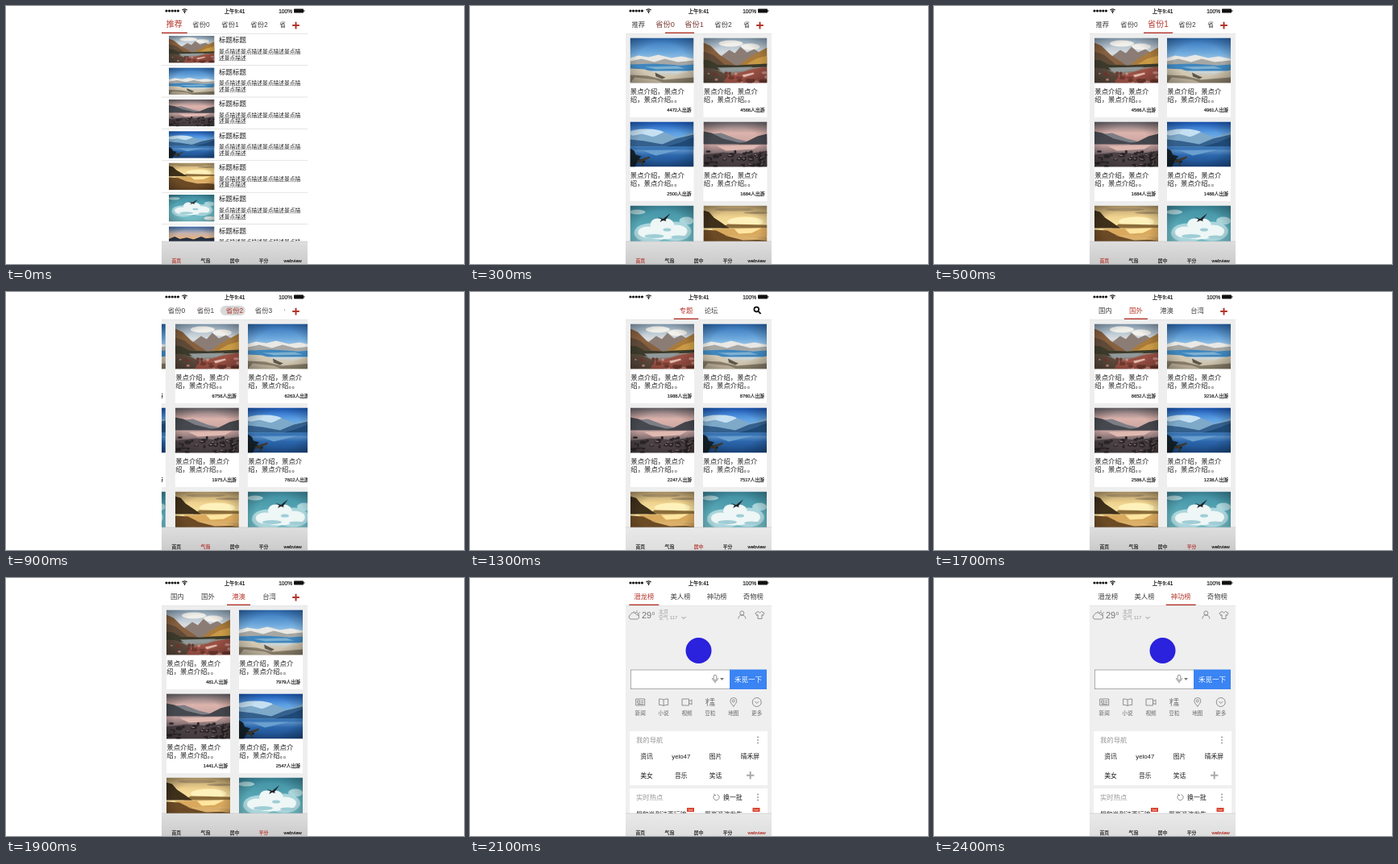
Recreate the animation shown at these times as an HTML page. Size 568 by 320 pixels, loop 2.5 s.

```html
<!DOCTYPE html>
<html lang="zh">
<head>
<meta charset="utf-8">
<title>Tab pages</title>
<style>
  html, body { margin: 0; width: 100%; height: 100%; overflow: hidden; background: #fff; }
  svg { display: block; width: 568px; height: 320px; }
  text { font-family: "Liberation Sans", "Noto Sans CJK SC", "Noto Sans CJK", sans-serif; fill: #1c1c1c; white-space: pre; }
  .intro { font-family: "Noto Sans CJK TC", "Noto Sans CJK", sans-serif; }
  .e { text-anchor: end; }
  .firm { stroke: #1c1c1c; stroke-width: .18; }
  .tab.on { fill: #b3352c; stroke: #b3352c; }
  .line { fill: none; stroke: #777; stroke-width: .8; }
</style>
</head>
<body>
<svg viewBox="-193 0 568 320">
  <defs>
    <clipPath id="screen"><path d="M0 0h181v320H0z"/></clipPath>
    <clipPath id="short"><path d="M0 12h153v24H0z"/></clipPath>
    <filter id="soft" x="-5%" y="-5%" width="110%" height="110%"><feGaussianBlur stdDeviation=".5"/></filter>
    <radialGradient id="edge" r=".75"><stop offset=".5" stop-opacity="0"/><stop offset="1" stop-opacity=".38"/></radialGradient>
  </defs>
  <g id="phone" clip-path="url(#screen)"></g>
</svg>
<script>
const WIDTH = 181, STEP = 100, RED = '#b3352c';
const $ = s => document.querySelector(s);
const text = (x, y, size, str, attr = '') =>
  `<text x="${x}" y="${y + size * .37}" font-size="${size}" ${attr}>${str}</text>`;
const mid = (x, y, size, str, attr = '') => text(x, y, size, str, `text-anchor="middle" ${attr}`);
const rect = (x, y, w, h, fill, attr = '') =>
  `<rect x="${x}" y="${y}" width="${w}" height="${h}" fill="${fill}" ${attr}/>`;
const path = (fill, d) => `<path fill="${fill}" d="${d}"/>`;
const line = (x, y, d) => `<path class="line" transform="translate(${x} ${y})" d="${d}"/>`;
const ovals = (fill, list) => list.map(([x, y, rx, ry = rx]) =>
  `<ellipse cx="${x}" cy="${y}" rx="${rx}" ry="${ry}" fill="${fill}"/>`).join('');
const fade = (id, ...colors) => `<linearGradient id="${id}" x2="0" y2="1">${colors.map((c, i) =>
  `<stop offset="${i / (colors.length - 1)}" stop-color="${c}"/>`).join('')}</linearGradient>`;
const range = n => [...Array(n).keys()];
const lerp = (f, p) => {
  const i = Math.floor(p);
  return f(i) + (f(i + 1) - f(i)) * (p - i);
};

let seed = 7;
const random = () => (seed = seed * 16807 % 2147483647) / 2147483647;
const visitors = () => 1000 + Math.floor(random() * 8000);

// Landscapes, each on a 79 by 56 field over a graded backdrop
const scatter = (n, top) => range(n).map(() =>
  [random() * 79, top + random() * (56 - top), 1.2 + random() * 3, .8 + random() * 1.6]);
const stones = scatter(50, 37), leaves = scatter(24, 43);
const photos = [
  [['#8fa9bf', '#d8dde0', '#8e8a80', '#6d665c'],
    ovals('#f1efea', [[34, 7, 15, 4], [58, 11, 12, 4]]) +
    path('#8b7d75', 'M18 26L32 15l7 4 7-8 8 7 9-4 16 10v10H18z') +
    path('#86603f', 'M0 6l9 4 11 11 15 10 5 4H0z') + path('#5f4a38', 'M0 17l12 4 14 12H0z') +
    path('#a87a3c', 'M79 12L66 19 54 26 44 34h35z') + path('#c99a45', 'M79 22l-14 4-12 7h26z') +
    path('#3b3a2b', 'M0 27l8 1 9 5 24 1 38-2v4l-30 1-30 3-19-2z') +
    path('#92999a', 'M17 37l44-1-10 5-26 2z') + path('#59493c', 'M0 37l13 1 14 7 14 5v6H0z') +
    path('#9b5044', 'M30 47l16-4 18-5 15-2v20H24z') + ovals('#c98b80', leaves.slice(0, 10)) +
    ovals('#70392f', leaves.slice(10)) + path('#e0b9ac', 'M48 46l14-3 1 2-13 4z')],
  [['#2f6fb8', '#6faadd', '#d9e6ec', '#b3a994'],
    path('#e9e8e4', 'M0 25l10-3 13 2 12-3 16 4 13-2 15 3v10H0z') +
    path('#a6a7a4', 'M0 29l14-3 16 4 13-4 16 4 20-2v6H0z') +
    path('#3f86bd', 'M0 33l30-1 32 2 17-1v8H0z') + path('#7db0d0', 'M18 36l40-1 10 3-35 1z') +
    path('#d2c7b1', 'M0 38l18 1 18 6 20 1 23-6v16H0z') + path('#8f846f', 'M0 46l22 1 20 5 37-3v7H0z') +
    path('#c6baa3', 'M6 49l26 3 10 4H0z') + path('#5d564b', 'M31 43l8 4 5 2-4 2-8-3z')],
  [['#6c686f', '#dcb3ac', '#c8a3a0', '#6c5f63', '#332d30'],
    path('#7d7d85', 'M0 16l22-2 18 7 16 4 23-6v8H0z') +
    path('#45494f', 'M0 12l10 2 14 7 20 5 35-1v3H0z') + path('#43454b', 'M79 15l-12 3-14 7-10 3h36z') +
    path('#e0b9b1', 'M16 30l54-1-8 5-34 2z') + path('#4b4145', 'M0 41l24-3 30 2 25-4v20H0z') +
    ovals('#2a2528', stones) + ovals('#97807f', stones.slice(0, 20).map(([x, y]) => [x, y - .8, 1.4, .6]))],
  [['#1c5cc0', '#5c9fe2', '#8fbfe2', '#2b66ac', '#1c4a86'],
    ovals('#c5e0f2', [[20, 14, 22, 5]]) +
    path('#7fa9c9', 'M0 18l15-3 14 4 13-6 17 7 20-7v18H0z') +
    path('#34608d', 'M0 22l18 2 22 4 17-7 22-5v15H0z') + path('#1f4a78', 'M79 19l-17 7-18 5h35z') +
    path('#3974b5', 'M0 31h79v4H0z') + path('#6aa0cf', 'M16 36l46-1-30 7z') +
    path('#14222c', 'M0 33l5 3 2 5 7 2-3 3 8 3-1 2-9-1-3 6H0z') +
    path('#3f3a30', 'M9 48l15-5 1 2-9 4 1 6h-2l-1-5-5 1z')],
  [['#b79c6c', '#efd28e', '#fbe7a8', '#c99650', '#5b4125'],
    ovals('#fff1bb', [[52, 20, 22, 6]]) + ovals('#a9926b', [[38, 5, 24, 2], [65, 9, 15, 1.5]]) +
    path('#8b6d3a', 'M30 23l49 1v4H22z') + path('#3f301a', 'M0 6l7 2 6 7 9 6 10 7H0z') +
    path('#d9a95d', 'M10 29l69-1v9H20z') + path('#ffe6a0', 'M38 29l34-1-12 6-16 1z') +
    path('#6b4a25', 'M0 30l16 1 12 6 30 4 21 3v12H0z') + path('#dcb06a', 'M26 37l28 1 25 4-30 1z')],
  [['#3f8fa3', '#5cabb8', '#7cc3cb'],
    ovals('#a9d5db', [[25, 34, 20, 12], [56, 32, 20, 12], [9, 8, 10, 3], [70, 19, 9, 5]]) +
    ovals('#eef6f6', [[22, 33, 12, 7], [34, 24, 9, 8], [45, 25, 10, 9], [57, 32, 14, 8], [39, 36, 20, 6], [71, 49, 10, 4]]) +
    ovals('#9fcdd5', [[30, 38, 12, 2.5], [60, 39, 9, 2], [46, 30, 5, 2]]) +
    path('#23262e', 'M34 14l7 2.500 9-7-6 8.500 1 1.500-4-1-4 2 2-3.500z')],
  [['#3f73b8', '#c4b3b0', '#f0b070', '#54638a', '#2c3752'],
    path('#26303f', 'M0 26l10-5 9 5 12-3 12 4 13-6 8 4 15-2v11H0z') +
    path('#c98d64', 'M20 35h42l-18 9z') + path('#2d384e', 'M0 45l24 3 55-4v12H0z')]
];
const defs = fade('bar', '#dedede', '#cbcbcb') + fade('paleBar', '#e9e9e9', '#dedede') +
  photos.map(([sky, art], i) => fade('sky' + i, ...sky) +
    `<symbol id="photo${i}" viewBox="0 0 79 56" preserveAspectRatio="none">${rect(0, 0, 79, 56, `url(#sky${i})`)}
    <g filter="url(#soft)">${art}</g>${rect(0, 0, 79, 56, 'url(#edge)')}</symbol>`).join('');
const photo = (i, x, y, w, h) => `<use href="#photo${i}" x="${x}" y="${y}" width="${w}" height="${h}"/>`;

function listPage() {
  return rect(0, 35, WIDTH, 285, '#fff') + range(7).map(i => {
    const y = i * 39.4;
    return photo(i, 9, 37 + y, 56.5, 33.5) + text(71, 42.3 + y, 8.5, '标题标题') +
      text(71, 56.5 + y, 6.75, '景点描述景点描述景点描述景点描') +
      text(71, 64.2 + y, 6.75, '述景点描述') + rect(0, 73.3 + y, WIDTH, .6, '#d2d2d2');
  }).join('');
}

function gridPage(counts = []) {
  return rect(0, 35, WIDTH, 285, '#eee') + range(6).map(i => {
    const x = 6 + i % 2 * 90, y = 39.5 + (i >> 1) * 104;
    return rect(x, y, 79, 98.5, '#fff') + photo(i, x, y, 79, 56) +
      text(x + .3, y + 66.3, 8.4, '景点介绍，景点介', 'class="intro"') +
      text(x + .3, y + 76.2, 8.4, '绍，景点介绍。。', 'class="intro"') +
      text(x + 76, y + 89.7, 5.8, `${counts[i] || visitors()}人出游`, 'class="e firm"');
  }).join('');
}

function webPage() {
  const grey = 'style="fill:#999"', white = 'style="fill:#fff"';
  const menu = y => ovals('#999', [-3.4, 0, 3.4].map(d => [164, y + d, 1]));
  const icons = [
    'M-5.5-4h11v8h-11zM-3.5-2h3v3h-3zM1-1.5h3M1 .5h3M-3.5 2.5h7.5',
    'M0-3c-2-1-4-1-5.5-1v7.5c2 0 4 0 5.5 1 1.5-1 3.5-1 5.5-1V-4C4-4 2-4 0-3v7.5',
    'M-6-4h8.5v8H-6zM2.5-1L6-3v6L2.5 1',
    'M-3.5-5v10M-5.5-1h4M-5.5-4l1 2M-1.5-4l-1 2M-3.5-1l-2 3M0-4.5h5M-.5-2.5h6M2.5-4.5v4M0 .5h5M0 2v3M0 2h5v3M2 2v3M3.500 2v3',
    'M0 5.5C-2 2-4 1-4-1.5a4 4 0 0 1 8 0C4 1 2 2 0 5.5zM-1.5-1.5a1.5 1.5 0 1 0 3 0a1.5 1.5 0 1 0-3 0',
    'M-5.5 0a5.5 5.5 0 1 0 11 0a5.5 5.5 0 1 0-11 0M-2.5-1L0 1.5 2.5-1'
  ];
  const links = ['资讯', 'yelo47', '图片', '晴禾屏', '美女', '音乐', '笑话'];
  return rect(0, 35, WIDTH, 285, '#efefef') +
    line(11, 47, 'M-5 4a3 3 0 0 1 0-5.5a4 4 0 0 1 7.5 0a2.8 2.8 0 0 1 1 5.5zM1-4a3 3 0 0 1 4 4M3-7v1.5M7-4.5l-1.5 1M-1-6l.8 1.2') +
    text(20, 45.6, 11, '29°', 'style="fill:#777"') +
    text(41, 41.6, 6, '北京', grey) + text(41, 49.2, 6, '空气 117', grey) +
    line(72, 49, 'M-2.5-1L0 1.5 2.5-1') +
    line(144.3, 45.5, 'M-2.5-2a2.5 2.5 0 1 0 5 0a2.5 2.5 0 1 0-5 0M-4.5 5c0-6 9-6 9 0') +
    line(166.5, 46, 'M-2-4.5c1 2 3 2 4 0l3.5 2-1.5 3-1.5-1V4.5h-5V-.5l-1.5 1-1.5-3z') +
    ovals('#2a22dc', [[90.5, 90, 16]]) +
    rect(6.4, 114, 123, 23.6, '#fff', 'stroke="#999" stroke-width=".8"') +
    line(111, 125, 'M-1.8-3a1.8 1.8 0 0 1 3.6 0v3a1.8 1.8 0 0 1-3.6 0zM-3.5-1c0 5.5 7 5.5 7 0M0 3v2.5') +
    path('#777', 'M117 124h5l-2.5 3z') + rect(129, 113.5, 46, 24.5, '#3a84f3') +
    mid(152, 126, 8.5, '禾觅一下', white) +
    ['新闻', '小说', '视频', '豆粒', '地图', '更多'].map((s, i) =>
      line(18.2 + i * 28.9, 154, icons[i]) + mid(18.2 + i * 28.9, 167.2, 6.6, s, 'style="fill:#666"')).join('') +
    rect(5, 190, 171, 67, '#fff') + text(13, 201, 8.4, '我的导航', grey) + menu(201) +
    links.map((s, i) => mid(26 + i % 4 * 42.8, i < 4 ? 221.6 : 244.8, 7.8, s)).join('') +
    path('#aaa', 'M150 243.8h3.7v-3.7h2v3.7h3.7v2h-3.7v3.7h-2v-3.7H150z') +
    rect(5, 261, 171, 59, '#fff') + text(13, 272, 8.4, '实时热点', grey) + menu(272) +
    line(112.5, 272, 'M1-3.5A3.6 3.6 0 1 1-2.5-2.6M-2.5-4.5v2h2') + text(121, 272, 7.9, '换一批') +
    text(13, 293.2, 7.8, '假和尚到江西行骗') + text(98, 293.2, 7.8, '罗岚巡演发生') +
    [76, 157.5].map(x => rect(x, 285, 9, 5, '#d9432f') + mid(x + 4.5, 287.6, 3.6, 'hot', white)).join('');
}

const provinces = ['推荐', ...range(6).map(i => '省份' + i)];
const wide = {
  titles: provinces, size: 8.4, clip: true, icon: 'plus',
  center: i => i ? 13 + 36 * i : 15.8, width: i => i ? 36 : 32
};
const even = (titles, first, gap, w) =>
  ({ titles, size: 8.4, center: i => first + gap * i, width: () => w });
const pagesOf = (titles, known) => titles.map((_, i) => gridPage(known[i]));
const withList = known => [listPage(), ...pagesOf(provinces, known).slice(1)];

const scenes = [
  { ...wide, grow: .2, pages: withList({ 2: [4566, 4961, 1684, 1488] }) },
  { ...wide, pill: true, pages: withList({ 3: [6758, 6263, 1975, 7602] }) },
  { ...even(['专题', '论坛'], 75, 31, 30.5), icon: 'search', pale: true },
  { ...even(['国内', '国外', '港澳', '台湾'], 19.3, 38.1, 29), icon: 'plus' },
  { ...even(['潜龙榜', '美人榜', '神功榜', '奇物榜'], 22.8, 45.2, 37), pale: true }
];
scenes[2].pages = pagesOf(scenes[2].titles, { 0: [1988, 8760, 2247, 7517] });
scenes[3].pages = pagesOf(scenes[3].titles, { 0: [4103, 3130, 1675, 1890], 2: [481, 7979, 1441, 2547] });
scenes[4].pages = scenes[4].titles.map(webPage);

const navIcons = {
  plus: path(RED, 'M162.2 23.1h3.3v-3.3h2v3.3h3.3v2h-3.3v3.3h-2v-3.3h-3.3z'),
  search: '<path d="M159.4 21.6a2.9 2.9 0 1 0 5.8 0a2.9 2.9 0 1 0-5.8 0M164.4 23.8l3.2 3.2" fill="none" stroke="#111" stroke-width="1.8"/>'
};

const sceneMarkup = s => `<g class="scene">
  <g class="pages">${s.pages.map((p, i) => `<g transform="translate(${i * WIDTH})">${p}</g>`).join('')}</g>
  ${rect(0, 0, WIDTH, 34.5, '#fff')}${rect(0, 34, WIDTH, .6, '#d4d4d4')}
  <g ${s.clip ? 'clip-path="url(#short)"' : ''}><g class="strip">
    ${s.pill ? rect(0, 17, 31, 12, '#d8d8d8', 'class="mark" rx="6"') : rect(0, 32.6, 1, 1.4, RED, 'class="mark"')}
    ${s.titles.map((t, i) => mid(s.center(i), 23, s.size, t, 'class="title"')).join('')}
  </g></g>${navIcons[s.icon] || ''}</g>`;

const status = ovals('#111', range(5).map(i => [6 + i * 3.6, 6, 1.6])) +
  '<path d="M25.3 5.2a4.5 4.5 0 0 1 6.4 0M26.8 6.7a2.5 2.5 0 0 1 3.4 0" fill="none" stroke="#111" stroke-width="1.1"/>' +
  ovals('#111', [[28.5, 8, .9]]) + mid(90.5, 6.2, 6.4, '上午9:41', 'font-weight="bold"') +
  text(162, 6.2, 6.6, '100%', 'class="e firm"') + rect(164, 3.6, 12, 5, '#111', 'rx=".8"') + rect(176.4, 5, .9, 2.2, '#111');

$('#phone').innerHTML = `<defs>${defs}</defs>` + scenes.map(sceneMarkup).join('') + status +
  rect(0, 292, WIDTH, 28, 'url(#bar)', 'id="tabs"') + rect(0, 291.7, WIDTH, .6, '#c4c4c4') +
  ['首页', '气泡', '居中', '平分', 'webview'].map((s, i) =>
    mid(18.3 + i * 36.1, 315.7, 5.8, s, 'class="tab firm"')).join('');

const groups = [...document.querySelectorAll('.scene')];
const tabs = [...document.querySelectorAll('.tab')];
scenes.forEach((s, i) => {
  const g = groups[i];
  s.strip = g.querySelector('.strip');
  s.mark = g.querySelector('.mark');
  s.row = g.querySelector('.pages');
  s.labels = [...g.querySelectorAll('.title')];
});

// Page positions at successive steps, one list per tab
const swipes = [
  [0, .4, 1, 1.5, 1.95, 2],
  [0, .8, 1.9, 2.94, 3, 3.5, 4],
  [0, .9],
  [0, .6, 1, 1.9, 2, 2.6],
  [0, .7, 1.7, 2]
];
const timeline = swipes.flatMap((list, tab) => list.map(pos => [tab, pos]));

const shade = w => `rgb(${[[64, 181], [64, 56], [64, 46]].map(([a, b]) => Math.round(a + (b - a) * w))})`;

function show(tab, pos) {
  const s = scenes[tab];
  groups.forEach((g, i) => g.style.display = i === tab ? '' : 'none');
  tabs.forEach((t, i) => t.classList.toggle('on', i === tab));
  $('#tabs').setAttribute('fill', s.pale ? 'url(#paleBar)' : 'url(#bar)');
  s.row.setAttribute('transform', `translate(${-pos * WIDTH})`);
  const scroll = s.clip ? Math.max(0, s.center(Math.round(pos)) - 90.5) : 0;
  s.strip.setAttribute('transform', `translate(${-scroll})`);
  const w = s.pill ? 31 : lerp(s.width, pos);
  s.mark.setAttribute('x', lerp(s.center, pos) - w / 2);
  s.mark.setAttribute('width', w);
  s.labels.forEach((el, i) => {
    const near = Math.max(0, 1 - Math.abs(i - pos));
    el.style.fill = shade(near);
    el.setAttribute('font-size', s.size * (1 + (s.grow || 0) * near));
  });
}

let last = -1;
function tick() {
  const step = Math.floor(performance.now() / STEP) % timeline.length;
  if (step !== last) show(...timeline[last = step]);
  requestAnimationFrame(tick);
}
tick();
</script>
</body>
</html>
```
